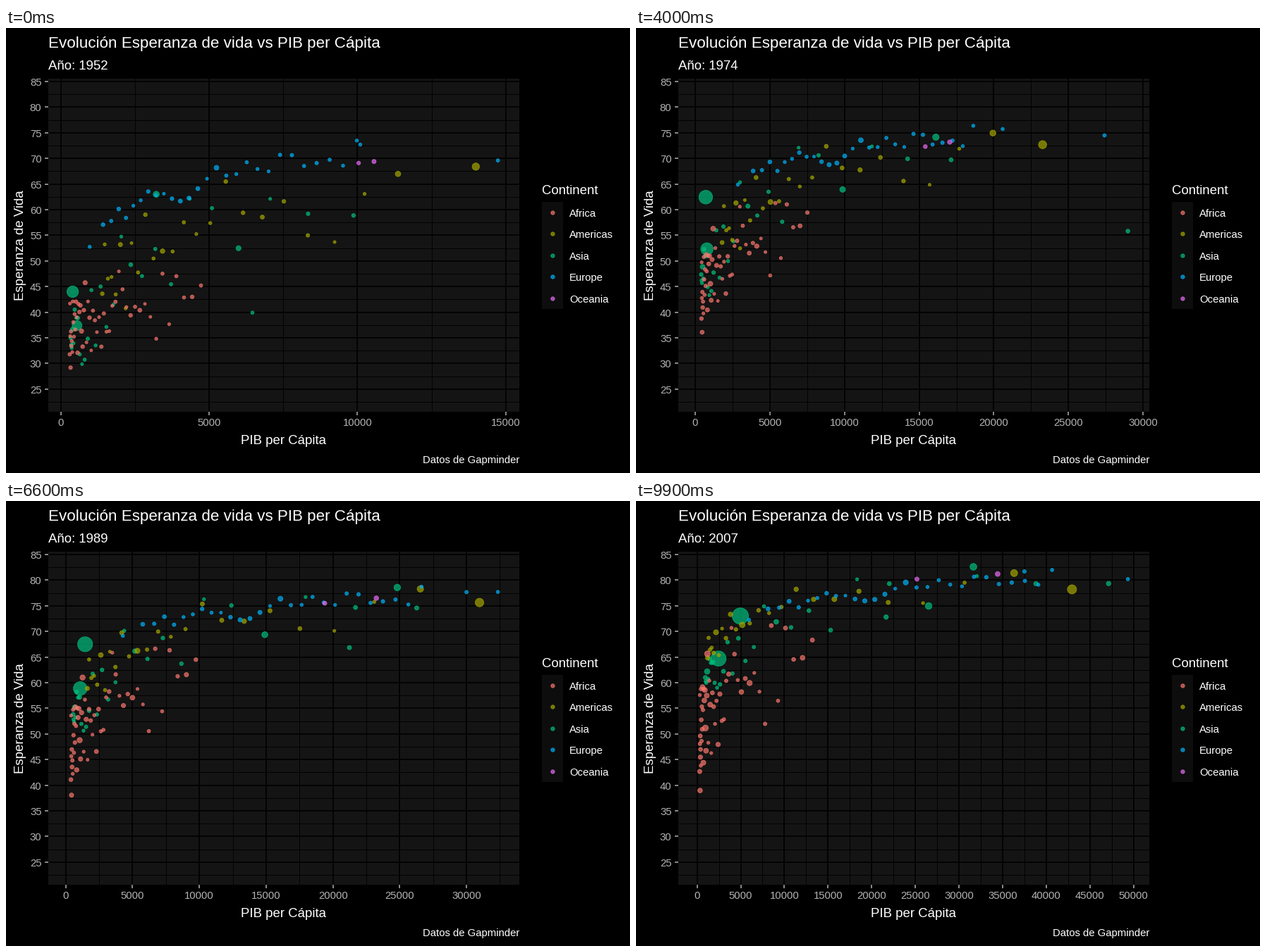
Recreate the animation shown at these times as a matplotlib script. Size 885 px wide and 632 px high, loop 10 s.

```python
import numpy as np
import matplotlib.pyplot as plt
from matplotlib.animation import FuncAnimation
from matplotlib.collections import LineCollection
from matplotlib.patches import Rectangle

W, H, FRAMES = 885, 632, 100
LEFT, RIGHT, TOP, BOTTOM = 60, 728, 72, 544.5
PT = 0.72  # points per pixel at 100 dpi
GREY = "#b3b3b3"
COLORS = {"Africa": "#F8766D", "Americas": "#A3A500", "Asia": "#00BF7D",
          "Europe": "#00B0F6", "Oceania": "#E76BF3"}
GDP_MIN, LIFE_MIN, LIFE_MAX = 300, 23.6, 82.6

years = np.linspace(1952, 2007, FRAMES)
progress = np.linspace(0, 1, FRAMES)
rng = np.random.default_rng(7)
dots = []  # (color, gdp, life, millions of people), one value per frame


def over_time(*values):
    """Values at 1952, 1979 and 2007, interpolated."""
    return np.interp(years, [1952, 1979, 2007], values)


def along(keys):
    return np.interp(years, list(keys), list(keys.values()))


def leader(continent, people, gdp, life):
    dots.append((COLORS[continent], along(gdp), along(life),
                 np.interp(progress, [0, 1], people)))


def cloud(continent, n, skew, growth, poor, rich, life_poor, life_rich, spread):
    """Countries spaced along log GDP; life expectancy rises with log GDP."""
    log_poor, log_rich = over_time(*np.log(poor)), over_time(*np.log(rich))
    y_poor, y_rich = over_time(*life_poor), over_time(*life_rich)
    for q in np.linspace(0, 1, n) ** skew:
        noise = np.clip(rng.normal(), -1.8, 1.8) * over_time(*spread)
        gdp = np.exp(log_poor + (log_rich - log_poor) * q)
        life = np.clip(y_poor + (y_rich - y_poor) * q + noise, LIFE_MIN, LIFE_MAX)
        people = min(8 * np.exp(1.1 * rng.normal()), 90) * growth ** (progress - .5)
        dots.append((COLORS[continent], gdp, life, people))


# The largest countries and those that set the right edge of the view
leader("Asia", (556, 1319), {1952: 400, 1977: 741, 1992: 1656, 2007: 4959},
       {1952: 44, 1962: 44.5, 1967: 58.4, 1977: 64, 2007: 73})
leader("Asia", (372, 1110), {1952: 547, 1977: 813, 1992: 1164, 2007: 2452},
       {1952: 37.4, 1977: 54.2, 1992: 60.2, 2007: 64.7})
leader("Asia", (86, 127), {1952: 3217, 1962: 6577, 1972: 14779, 1992: 26825, 2007: 31656},
       {1952: 63, 1967: 71.4, 1982: 77.1, 2007: 82.6})
leader("Asia", (4, 27), {1952: 6460, 1962: 11626, 1972: 24837, 1977: 34167, 1982: 33693,
                         1987: 21198, 2007: 21655},
       {1952: 39.9, 1967: 49.9, 1987: 66.3, 2007: 72.8})
leader("Americas", (158, 301), {1952: 13990, 1967: 19530, 1987: 29884, 2007: 42952},
       {1952: 68.4, 1967: 70.8, 1982: 74.7, 2007: 78.2})
leader("Europe", (5, 7.5), {1952: 14734, 1962: 20431, 1967: 22966, 1972: 27195,
                            1985: 28500, 2007: 37506}, {1952: 69.6, 2007: 81.7})
leader("Europe", (3.3, 4.6), {1952: 10095, 1972: 18965, 1982: 26299, 1987: 31541,
                              1992: 33966, 1997: 41283, 2007: 49357},
       {1952: 72.7, 2007: 80.2})

cloud("Asia", 28, 1.35, 2.6, poor=(331, 420, 944), rich=(9867, 19300, 47143),
      life_poor=(35, 50, 61), life_rich=(60, 73, 80), spread=(6, 5, 3.5))
cloud("Americas", 24, 1.15, 2.4, poor=(1398, 1900, 1202), rich=(11367, 22500, 36319),
      life_poor=(44, 56, 65), life_rich=(66, 76, 81), spread=(6, 4, 2.3))
cloud("Europe", 28, .55, 1.3, poor=(974, 3600, 5937), rich=(9980, 21300, 40676),
      life_poor=(54, 68.5, 73), life_rich=(71, 75, 80.5), spread=(1.5, 1.2, .9))
cloud("Africa", 52, 1.2, 3.4, poor=(300, 450, 300), rich=(4725, 8300, 13206),
      life_poor=(36, 45, 49), life_rich=(43, 60, 65), spread=(4, 4.5, 6))
cloud("Oceania", 2, 1, 1.8, poor=(10040, 16900, 25185), rich=(10557, 18900, 34435),
      life_poor=(69.1, 73, 80.2), life_rich=(69.4, 74, 81.2), spread=(0, 0, 0))

colors = [d[0] for d in dots]
gdp, life, people = (np.array([d[k] for d in dots]) for k in (1, 2, 3))
radius = 1.8 + 9.8 * np.sqrt(people / 1319)

fig = plt.figure(figsize=(W / 100, H / 100), dpi=100, facecolor="black")
ax = fig.add_axes([0, 0, 1, 1])
ax.set(xlim=(0, W), ylim=(H, 0))
ax.axis("off")


def text(x, y, s, size=14.93, color="white", **kw):
    return ax.text(x, y, s, fontsize=size * PT, color=color,
                   family="Liberation Sans", va="baseline", **kw)


def box(x, y, w, h, color):
    ax.add_patch(Rectangle((x, y), w, h, facecolor=color, linewidth=0, zorder=0))


def lines(width, color="black"):
    return ax.add_collection(LineCollection([], colors=color, linewidths=width * PT,
                                            zorder=1, capstyle="butt"))


def vertical(xs, y0, y1):
    return [[(x, y0), (x, y1)] for x in xs]


def horizontal(ys, x0, x1):
    return [[(x0, y), (x1, y)] for y in ys]


def y_px(v):
    span = LIFE_MAX - LIFE_MIN
    return TOP + (LIFE_MAX + .05 * span - v) * (BOTTOM - TOP) / (1.1 * span)


box(LEFT, TOP, RIGHT - LEFT, BOTTOM - TOP, "#141414")
y_breaks = np.arange(25, 86, 5)
y_major = y_px(y_breaks)
lines(.9).set_segments(horizontal(y_px(y_breaks - 2.5), LEFT, RIGHT))
x_minor = lines(.9)
lines(1.6).set_segments(horizontal(y_major, LEFT, RIGHT))
x_major = lines(1.6)
lines(1.5, GREY).set_segments(horizontal(y_major, LEFT - 5, LEFT))
x_ticks = lines(1.5, GREY)
for v, y in zip(y_breaks, y_major):
    text(50.5, y + 6, str(v), color=GREY, ha="right")
x_breaks = np.arange(0, 50001, 5000)
x_labels = [text(0, 565, str(v), color=GREY, ha="center") for v in x_breaks]

text(60, 28, "Evolución Esperanza de vida vs PIB per Cápita", 22.4)
year = text(60, 59, "", 18.67)
text(393.5, 591, "PIB per Cápita", 18.67, ha="center")
text(25, 308.5, "Esperanza de Vida", 18.67, rotation=90, rotation_mode="anchor", ha="center")
text(728, 618, "Datos de Gapminder", ha="right")

text(760, 236, "Continent", 18.67)
for k, (name, color) in enumerate(COLORS.items()):
    y = 261.7 + 30.45 * k
    box(760, 246.5 + 30.4 * k, 30, 30.4, "#0d0d0d")
    ax.scatter([775], [y], s=(5.4 * PT) ** 2, c=color, alpha=.7,
               linewidths=.9 * PT, edgecolors=color)
    text(799, y + 6, name)

points = ax.scatter(gdp[:, 0], life[:, 0], c=colors, alpha=.7,
                    linewidths=.9 * PT, edgecolors=colors, zorder=3)


def draw(i):
    span = gdp[:, i].max() - GDP_MIN

    def x_px(v):
        return LEFT + (v - GDP_MIN + .05 * span) * (RIGHT - LEFT) / (1.1 * span)

    points.set_offsets(np.column_stack([x_px(gdp[:, i]), y_px(life[:, i])]))
    points.set_sizes((2 * radius[:, i] * PT) ** 2)

    major, minor = x_px(x_breaks), x_px(x_breaks + 2500)
    shown = major[major < RIGHT]
    x_major.set_segments(vertical(shown, TOP, BOTTOM))
    x_ticks.set_segments(vertical(shown, BOTTOM, BOTTOM + 5))
    x_minor.set_segments(vertical(minor[minor < RIGHT], TOP, BOTTOM))
    for label, px in zip(x_labels, major):
        label.set_x(px)
        label.set_visible(px < RIGHT)
    year.set_text(f"Año: {years[i]:.0f}")
    return []


anim = FuncAnimation(fig, draw, frames=FRAMES, interval=100, repeat=True,
                     repeat_delay=0, blit=False)
plt.show()
```
